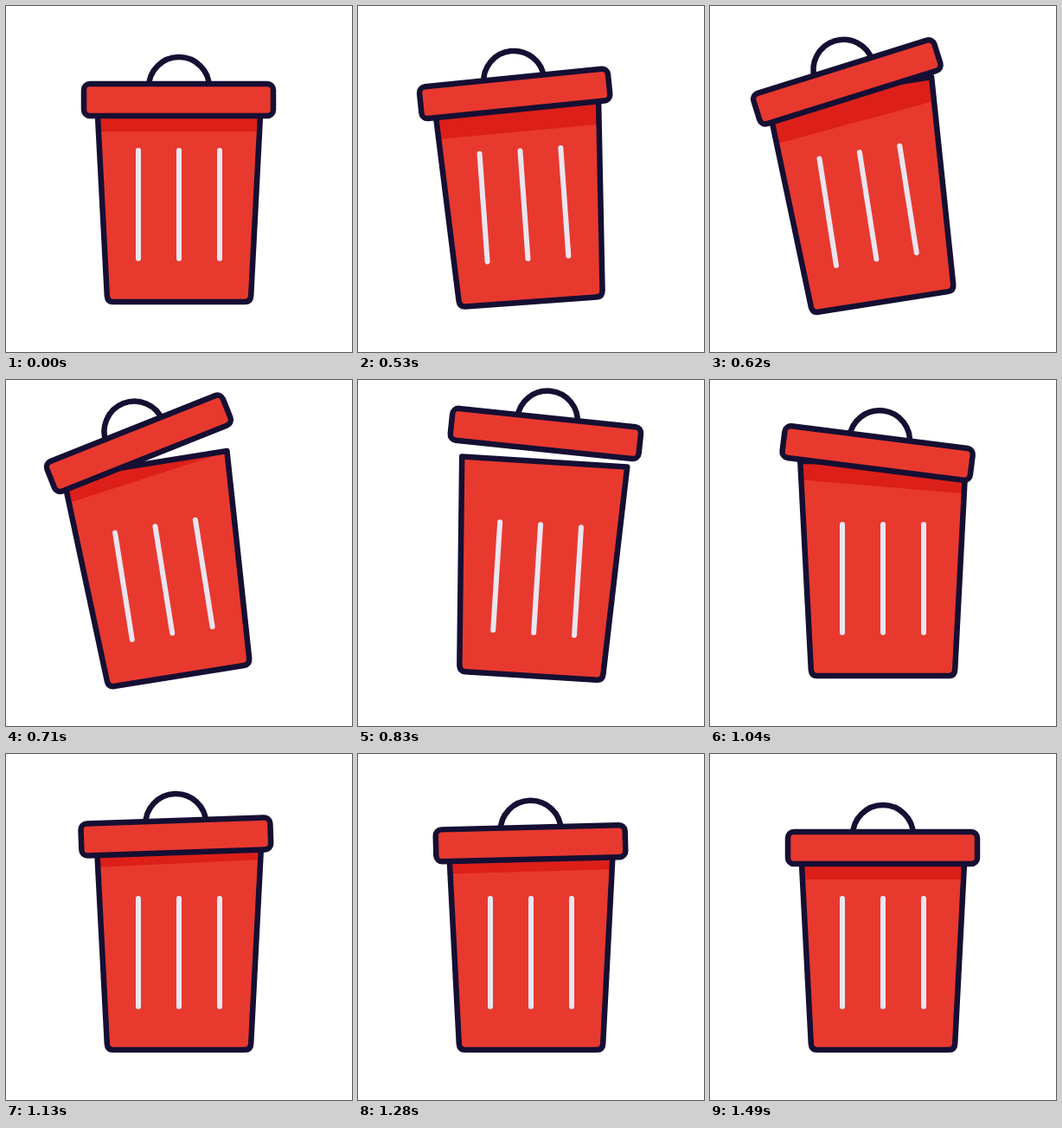
Write an HTML page that moves like this. It is 400x400 px and loops after 1.55 s.

```html
<!DOCTYPE html>
<html lang="en">
<head>
<meta charset="utf-8">
<title>Trash can</title>
<style>
  html, body { margin: 0; width: 100%; height: 100%; overflow: hidden; background: #fff; }
  svg { display: block; width: 100%; height: 100%; }
  .ink { stroke: #150f33; stroke-width: 6.5; stroke-linecap: round; stroke-linejoin: round; }
  .red { fill: #e8392f; }
</style>
</head>
<body>
<svg viewBox="0 0 400 400">
  <defs>
    <path id="can" d="M104.3 94H295.7L283.2 335Q282.7 342 276 342H124Q117.3 342 116.8 335Z"/>
    <clipPath id="inside"><use href="#can"/></clipPath>
  </defs>
  <g id="body">
    <use href="#can" class="red"/>
    <g clip-path="url(#inside)">
      <rect id="shade" x="-100" y="-155" width="600" height="300" fill="#dc1f19"/>
    </g>
    <use href="#can" class="ink" fill="none"/>
    <path d="M153 167V292M200 167V292M247 167V292" stroke="#ebe5f0" stroke-width="6" stroke-linecap="round"/>
  </g>
  <g id="lid">
    <path class="ink" fill="none" d="M-34.5 -14.5A35 35 0 0 1 35.5 -14.5"/>
    <rect class="ink red" x="-109.5" y="-18.5" width="219" height="37" rx="7"/>
  </g>
</svg>
<script>
const LOOP = 1550, START = 530, STEP = 30;

// Each track swings through a few [time, value] points, from rest to rest
const tracks = {
  tilt: [[415, 0], [680, -10.3], [850, 4.2], [1040, 0]],
  slide: [[417, 0], [690, -49.2], [845, 19.2], [1017, -6], [1250, 0]],
  rise: [[427, 0], [845, 46.7], [950, 37.2], [1130, 13], [1490, 0]],
  turn: [[448, 0], [695, -22.3], [912, 19.3], [1150, -2.4], [1450, 0]],
  lift: [[520, 0], [840, 55], [950, 26], [1130, 18.5], [1490, 0]],
  lean: [[480, 0], [700, -8.9], [935, 13], [1140, -2.75], [1450, 0]]
};

const [body, lid, shade] = ["body", "lid", "shade"].map(id => document.getElementById(id));

const rate = (a, b) => (b[1] - a[1]) / (b[0] - a[0]);

// Speed at a point: zero at peaks and ends, otherwise the harmonic mean of both sides
function speed(track, i) {
  if (i === 0 || i === track.length - 1) return 0;
  const p = rate(track[i - 1], track[i]), q = rate(track[i], track[i + 1]);
  return p * q > 0 ? 2 * p * q / (p + q) : 0;
}

function valueAt(track, t) {
  const i = track.findIndex(point => point[0] > t) - 1;
  if (i < 0) return 0;
  const [t0, v0] = track[i], [t1, v1] = track[i + 1];
  const span = t1 - t0, u = (t - t0) / span, w = 1 - u;
  return w * w * (1 + 2 * u) * v0 + u * u * (3 - 2 * u) * v1
    + span * u * w * (w * speed(track, i) - u * speed(track, i + 1));
}

function draw(time) {
  const t = time < START ? 0 : START + Math.floor((time - START) / STEP) * STEP;
  const at = name => valueAt(tracks[name], t);
  body.setAttribute("transform", `rotate(${at("tilt")} 200 341)`);
  lid.setAttribute("transform",
    `translate(${199.5 + at("slide")} ${108.5 - at("rise")}) rotate(${at("turn")})`);
  shade.setAttribute("transform", `translate(0 ${-at("lift")}) rotate(${at("lean")} 200 145)`);
}

const begin = performance.now();
function tick() {
  draw((performance.now() - begin) % LOOP);
  requestAnimationFrame(tick);
}
tick();
</script>
</body>
</html>
```
